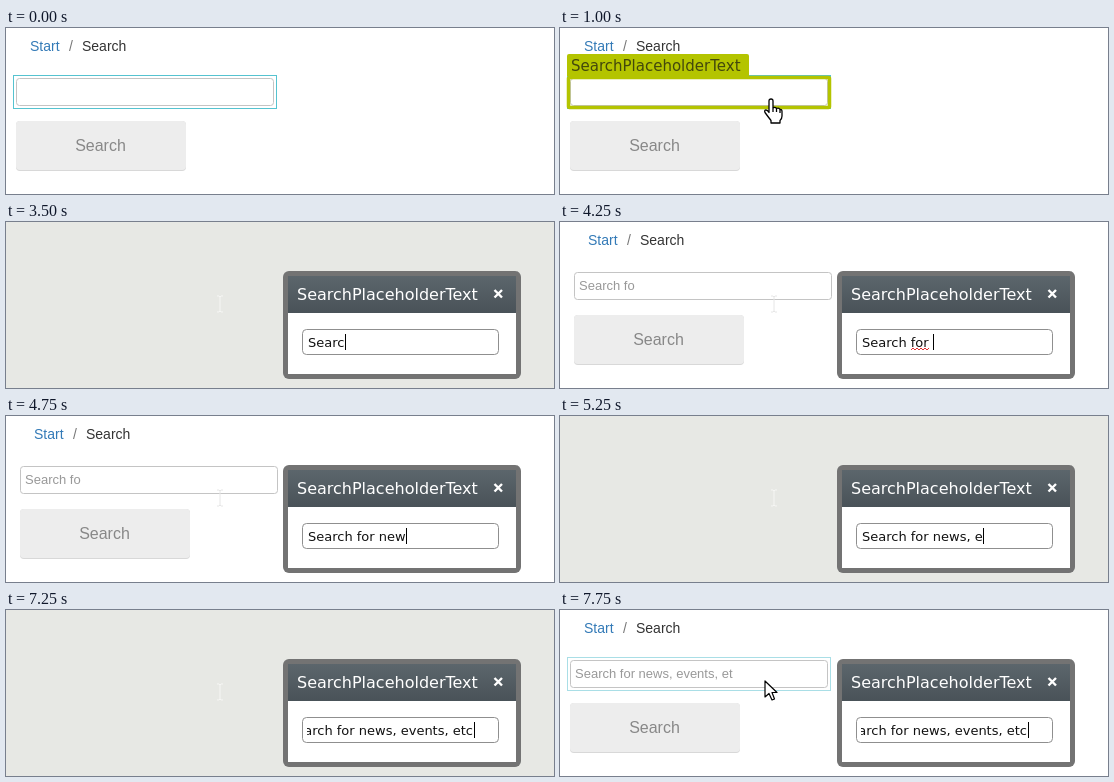
An HTML page that plays this animation: 548x166 px, repeating every 8000 ms.

```html
<!DOCTYPE html>
<html lang="en">
<head>
<meta charset="utf-8">
<title>Placeholder editor</title>
<style>
html, body { margin: 0; width: 100%; height: 100%; overflow: hidden; background: #fff; }
svg { display: block; width: 548px; height: 166px; }
text { white-space: pre; }
.page text { font-family: "Liberation Sans", Arial, sans-serif; font-size: 14px; fill: #333; }
.page .link { fill: #337ab7; }
.page .slash { fill: #777; }
.page .hint { font-size: 13px; fill: #999; }
.page .button { font-size: 16px; fill: #888; text-anchor: middle; }
.ui { font-family: "DejaVu Sans", Verdana, sans-serif; }
</style>
</head>
<body>
<svg viewBox="0 0 548 166">
  <defs>
    <linearGradient id="head" x2="0" y2="1">
      <stop stop-color="#5c666c"/><stop offset="1" stop-color="#495258"/>
    </linearGradient>
    <clipPath id="entry"><rect x="301" y="108" width="170" height="24"/></clipPath>
  </defs>
  <rect id="back" width="548" height="166"/>
  <g id="page" class="page">
    <text class="link" x="24" y="23">Start</text>
    <text class="slash" x="63" y="23">/</text>
    <text x="76" y="23">Search</text>
    <rect id="focus" x="7.500" y="47.500" width="263" height="33" fill="none"/>
    <rect x="10.500" y="50.500" width="257" height="27" rx="3" fill="#fff" stroke="#c4c4c4"/>
    <text id="hint" class="hint" x="15" y="68"></text>
    <rect x="10" y="93" width="170" height="50" rx="4" fill="#d8d8d8"/>
    <rect x="10" y="93" width="170" height="49" rx="4" fill="#ededed"/>
    <text class="button" x="94.500" y="123">Search</text>
  </g>
  <g id="marker">
    <path d="M7 48V28Q7 26 9 26H187Q189 26 189 28V48Z" fill="#b4c400"/>
    <rect x="8.500" y="49.500" width="261" height="30" rx="1" fill="none" stroke="#b4c400" stroke-width="3.500"/>
    <text class="ui" x="11" y="43" font-size="15" fill="#43480c">SearchPlaceholderText</text>
  </g>
  <g id="dialog" class="ui">
    <rect x="277" y="49" width="238" height="108" rx="6" fill="#737373"/>
    <rect x="282" y="54" width="228" height="98" fill="#fff"/>
    <rect x="282" y="54" width="228" height="37" fill="url(#head)"/>
    <text x="291" y="78" font-size="16" fill="#fff">SearchPlaceholderText</text>
    <path d="M488.500 68L496 75.500M496 68L488.500 75.500" stroke="#fff" stroke-width="2.400"/>
    <rect x="296.500" y="107.500" width="196" height="25" rx="4" fill="#fff" stroke="#8f8f8f"/>
    <g clip-path="url(#entry)">
      <text id="typed" y="125" font-size="13" fill="#111"></text>
      <path id="caret" d="M.5 112V128" stroke="#000"/>
      <path id="wave" d="M351 128l2-2 2 2 2-2 2 2 2-2 2 2 2-2 2 2 2-2" fill="none" stroke="#e03030"/>
    </g>
  </g>
  <path id="hand" fill="#fff" stroke="#000" stroke-width="1.300" stroke-linejoin="round"
    d="M-2 2Q-2 0 0 0Q2 0 2 2V9Q4 7.500 5.500 9.500Q8 8.500 9 10.500Q11 10 11 12.500V17Q11 20 9 21.500V24H0V21.500Q-2 19-6 13.500Q-7 11-5 11Q-3.500 11-2 13.500ZM2 9V13M5.500 9.500V13M9 10.500V14"/>
  <path id="arrow" fill="#fff" stroke="#000" stroke-width="1.200" stroke-linejoin="round"
    d="M0 0V16L4 12.500L7 19L9.500 18L7 11.500H12Z"/>
  <path id="beam" fill="none" d="M-3-8H-1L0-7L1-8H3M0-7V7M-3 8H-1L0 7L1 8H3"/>
</svg>
<script>
const LOOP = 8000;
const FULL = "Search for news, events, etc";
const $ = id => document.getElementById(id);
const pen = document.createElement("canvas").getContext("2d");
pen.font = '13px "DejaVu Sans", Verdana, sans-serif';

// Each step changes only the listed values; n counts typed letters, h hint letters.
const steps = [
  [0, { page: true, dx: 0, focus: "#55c3d0", marker: false, dialog: false,
        caret: false, wave: false, n: 0, h: 0, cursor: "", x: 0, y: 0 }],
  [500, { cursor: "arrow", x: 214, y: 112 }],
  [750, { cursor: "hand", x: 211, y: 76, marker: true }],
  [1000, { y: 71 }],
  [2000, { marker: false, focus: "#a9dee6", x: 212 }],
  [2250, { dialog: true }],
  [2500, { caret: true }],
  [2750, { n: 1 }],
  [3250, { n: 3 }],
  [3500, { n: 5, page: false, cursor: "beam", x: 214, y: 82 }],
  [3750, { n: 7 }],
  [4000, { n: 9, page: true, dx: 4, focus: "none", h: 6 }],
  [4250, { n: 11, h: 9, wave: true }],
  [4500, { n: 12 }],
  [4750, { n: 14, wave: false }],
  [5000, { n: 16, page: false }],
  [5250, { n: 18 }],
  [5500, { n: 19, page: true, h: 16 }],
  [5750, { n: 21, h: 18 }],
  [6000, { n: 23, focus: "#a9dee6", h: 21 }],
  [6250, { n: 25, h: 24 }],
  [6500, { n: 26 }],
  [6750, { n: 27 }],
  [7000, { n: 28, page: false }],
  [7500, { page: true, h: 27 }],
  [7750, { dx: 0, cursor: "arrow", x: 205, y: 71 }]
];

function show(id, on) {
  $(id).style.display = on ? "" : "none";
}

function draw(time) {
  const s = {};
  for (const [at, change] of steps) if (at <= time) Object.assign(s, change);

  $("back").setAttribute("fill", s.page ? "#fff" : "#e7e8e4");
  $("page").setAttribute("transform", `translate(${s.dx} 0)`);
  $("focus").setAttribute("stroke", s.focus);
  $("hint").textContent = FULL.slice(0, s.h);
  $("beam").setAttribute("stroke", s.page ? "#e6e6e6" : "#f6f6f4");
  for (const id of ["page", "marker", "dialog", "caret", "wave"]) show(id, s[id]);
  for (const id of ["hand", "arrow", "beam"]) {
    show(id, s.cursor === id);
    $(id).setAttribute("transform", `translate(${s.x} ${s.y})`);
  }

  const word = FULL.slice(0, s.n);
  const width = pen.measureText(word).width;
  const left = Math.min(302, 467 - width);
  $("typed").textContent = word;
  $("typed").setAttribute("x", left);
  $("caret").setAttribute("transform", `translate(${Math.round(left + width + .5)} 0)`);
}

const start = performance.now();
function tick() {
  draw((performance.now() - start) % LOOP);
  requestAnimationFrame(tick);
}
tick();
</script>
</body>
</html>
```
